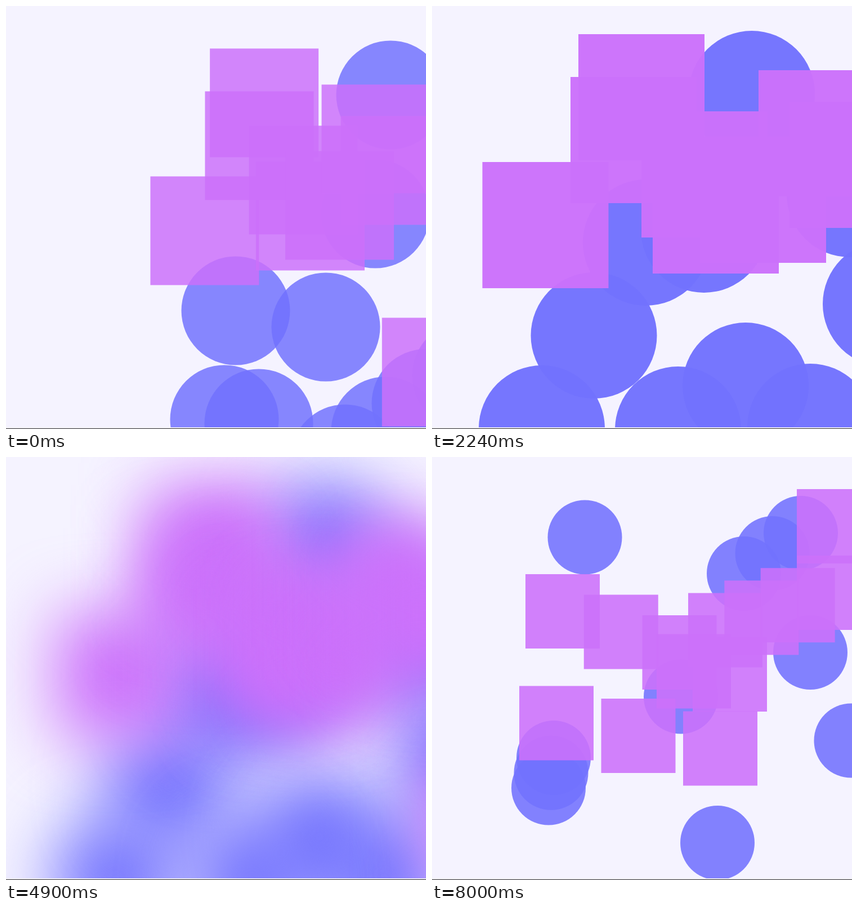
Animation, 746 px wide and 751 px high, one loop 8.02 s. Source, as an HTML page:

```html
<!DOCTYPE html>
<html lang="en">
<head>
<meta charset="utf-8">
<title>Shapes</title>
<style>
  html, body { margin: 0; width: 100%; height: 100%; overflow: hidden; background: #f5f3ff; }
  #stage { position: absolute; left: 0; top: 0; width: 746px; height: 748px; overflow: hidden; }
  #stage div { position: absolute; left: 0; top: 0; }
  .dot { background: #7272fe; border-radius: 50%; }
  .box { background: #cc71fb; }
  #rule { position: absolute; left: 0; top: 748px; width: 746px; height: 3px;
    background: linear-gradient(#fbfafc 0 1px, #c2c1c4 1px 2px, #55545a 2px); }
</style>
</head>
<body>
<div id="stage"></div>
<div id="rule"></div>
<script>
const LOOP = 8020, MOVE = 1165;
const SPREAD = 40, SOFTEN = 2885, SHRINK = 4941, GROW = 6572;
const BLUR = 60;

const clamp = x => Math.min(1, Math.max(0, x));
const mix = (a, b, k) => a + (b - a) * k;
const mixPoint = (a, b, k) => [mix(a[0], b[0], k), mix(a[1], b[1], k)];

// n centres evenly spaced from a to b
const row = (n, a, b = a) =>
  Array.from({ length: n }, (_, i) => mixPoint(a, b, n > 1 ? i / (n - 1) : 0));

let seed = 7;
function random() {
  seed = (seed * 16807) % 2147483647;
  return seed / 2147483647;
}
const strew = () => [mix(190, 860, random()), mix(290, 790, random())];
const gather = ([x, y]) => [mix(600, x, .62), y + 10];

const cluster = {
  dots: [
    ...row(3, [195, 750], [380, 420]),
    ...row(2, [483, 397], [806, 529]),
    ...row(1, [672, 747]),
    ...row(2, [557, 674], [437, 752]),
    ...row(2, [568, 156], [742, 334])
  ],
  boxes: [
    ...row(1, [201.5, 389]),
    ...row(2, [372, 162], [358, 238]),
    ...row(2, [504, 363], [484, 299]),
    ...row(2, [588, 344], [692, 226]),
    ...row(2, [747, 282], [865, 640])
  ]
};
const opening = {
  dots: [
    ...row(2, [388, 734], [449, 741]),
    ...row(2, [408, 541], [568, 570]),
    ...row(4, [818, 656], [602, 804]),
    ...row(2, [683, 158], [656, 369])
  ],
  boxes: cluster.boxes.map(gather)
};
const scatter = {
  dots: cluster.dots.map(strew),
  boxes: cluster.boxes.map(strew)
};
const fresh = {
  dots: [
    ...row(1, [271.5, 142.5]),
    ...row(3, [554, 207], [655, 135]),
    ...row(2, [442, 425.5], [672, 347]),
    ...row(3, [216, 534], [207, 587.5]),
    ...row(2, [507, 685], [744.5, 503.5])
  ],
  boxes: [
    ...row(1, [714, 123]),
    ...row(3, [232, 274], [439.5, 347]),
    ...row(4, [521, 307.5], [714, 241]),
    ...row(2, [465, 380.5], [529, 386]),
    ...row(3, [221, 472.5], [512, 517.5])
  ]
};

// cubic-bezier(.25, .1, .25, 1), solved by bisection
function ease(x) {
  x = clamp(x);
  let lo = 0, hi = 1;
  for (let i = 0; i < 24; i++) {
    const s = (lo + hi) / 2;
    if (.75 * s * (1 - s) + s ** 3 < x) lo = s; else hi = s;
  }
  const s = lo, r = 1 - s;
  return .3 * s * r * r + 3 * s * s * r + s ** 3;
}

function pose(t) {
  const since = start => ease((t - start) / MOVE);
  if (t < SHRINK) {
    const k = since(SPREAD);
    return {
      from: opening, to: cluster, k,
      size: mix(193, 224, k),
      alpha: mix(.84, .93, k) + .07 * clamp((t - 1500) / 1400),
      blur: BLUR * since(SOFTEN)
    };
  }
  if (t < GROW) {
    const k = since(SHRINK);
    return {
      from: cluster, to: scatter, k,
      size: 224 * (1 - k), alpha: 1 - k,
      blur: BLUR * (1 - ease((t - SHRINK) / 500))
    };
  }
  const k = since(GROW);
  return { from: fresh, to: fresh, k: 0, size: 132 * k, alpha: .88 * Math.min(1, k * 1.2), blur: 0 };
}

const stage = document.getElementById('stage');
function makeShapes(kind, className) {
  return fresh[kind].map((_, index) => {
    const el = document.createElement('div');
    el.className = className;
    stage.appendChild(el);
    return { el, kind, index };
  });
}
const shapes = [...makeShapes('dots', 'dot'), ...makeShapes('boxes', 'box')];

function draw(t) {
  const { from, to, k, size, alpha, blur } = pose(t);
  const filter = blur > .05 ? `blur(${blur.toFixed(2)}px)` : 'none';
  for (const { el, kind, index } of shapes) {
    const start = from[kind][index];
    el.hidden = !start;
    if (!start) continue;
    const [x, y] = mixPoint(start, to[kind][index], k);
    el.style.width = el.style.height = size + 'px';
    el.style.transform = `translate(${x - size / 2}px, ${y - size / 2}px)`;
    el.style.opacity = alpha;
    el.style.filter = filter;
  }
}

const begin = performance.now();
function tick() {
  draw((performance.now() - begin) % LOOP);
  requestAnimationFrame(tick);
}
draw(0);
requestAnimationFrame(tick);
</script>
</body>
</html>
```
